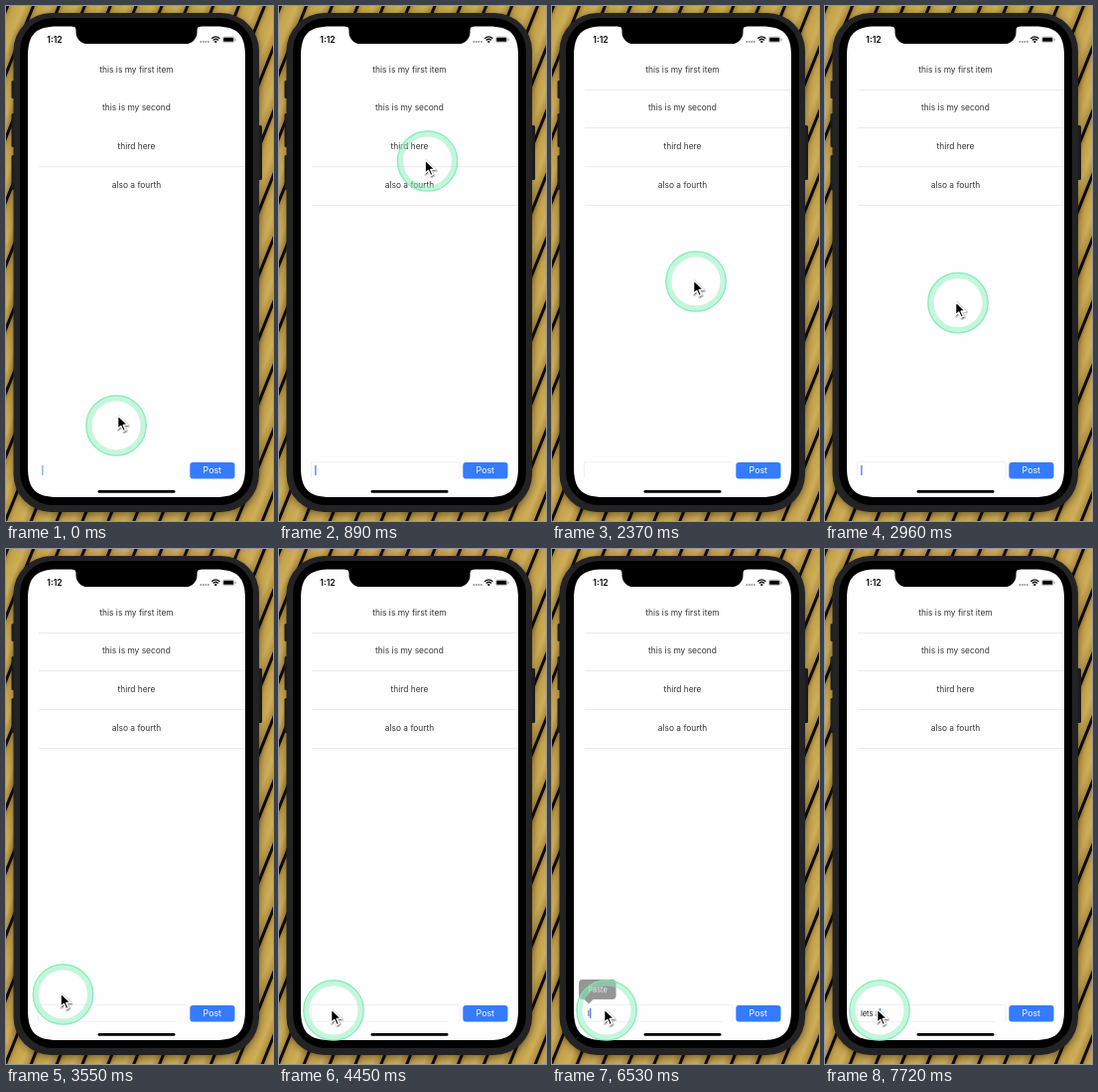
An HTML page that plays this animation: 269 by 518 pixels, repeating every 8 s.

```html
<!DOCTYPE html>
<html lang="en">
<head>
<meta charset="utf-8">
<title>List app demo</title>
<style>
  html, body { margin: 0; width: 100%; height: 100%; overflow: hidden; }
  svg { display: block; width: 100vw; height: 100vh; }
  text { font-family: Inter, "Liberation Sans", sans-serif; }
  .mid { text-anchor: middle; }
  .row { font-size: 8.4px; fill: #333; }
  .hair { fill: #ebebeb; }
</style>
</head>
<body>
<svg viewBox="0 0 269 518">
  <defs>
    <linearGradient id="plank">
      <stop offset="0" stop-color="#8f7130"/>
      <stop offset=".3" stop-color="#c5a24c"/>
      <stop offset=".7" stop-color="#ceae58"/>
      <stop offset="1" stop-color="#ad8c40"/>
    </linearGradient>
    <pattern id="wood" width="24" height="40" patternUnits="userSpaceOnUse" patternTransform="rotate(22)">
      <rect width="24" height="40" fill="url(#plank)"/>
      <rect width="3" height="40" fill="#0d0b06"/>
    </pattern>
    <filter id="soft" x="-10%" y="-10%" width="120%" height="120%">
      <feGaussianBlur stdDeviation="4"/>
    </filter>
    <path id="arrow" d="M0 0V14L3.300 11L5.600 16.300L8 15.200L5.800 10H10.200Z"/>
  </defs>

  <rect width="269" height="518" fill="url(#wood)"/>
  <rect x="8" y="9" width="247" height="502" rx="38" fill="#000" opacity=".45" filter="url(#soft)"/>

  <g fill="#1b1b1d">
    <rect x="5.500" y="75" width="5" height="18" rx="1.500"/>
    <rect x="5.500" y="108" width="5" height="34" rx="1.500"/>
    <rect x="5.500" y="150" width="5" height="35" rx="1.500"/>
    <rect x="253" y="120" width="5" height="55" rx="1.500"/>
  </g>
  <rect x="7.500" y="7" width="247.500" height="502" rx="38" fill="#232325"/>
  <rect x="14" y="12" width="235" height="490" rx="33" fill="#000"/>
  <path d="M22 50.500c0-22 8-30 30-30H211c22 0 30 8 30 30V464c0 22-8 30-30 30H52c-22 0-30-8-30-30Z" fill="#fefefe"/>

  <g id="list"></g>

  <path d="M66.500 20.500A4 4 0 0 1 70.500 24.500V26.500A11.500 11.500 0 0 0 82 38H181A11.500 11.500 0 0 0 192.500 26.500V24.500A4 4 0 0 1 196.500 20.500V19.500H66.500Z"/>
  <text x="41.300" y="36.800" font-size="8.600" font-weight="600">1:12</text>
  <path d="M195.600 36H205" stroke="#777" stroke-width="1.500" stroke-dasharray="1.500 1"/>
  <g fill="none" stroke="#111" stroke-width="1.300">
    <path d="M207.200 32.800Q211.300 29 215.400 32.800M208.700 34.500Q211.300 32.100 213.900 34.500"/>
    <circle cx="211.300" cy="36" r=".5"/>
  </g>
  <rect x="218.400" y="31" width="11.600" height="5.600" rx="1.600" fill="none" stroke="#999" stroke-width=".6"/>
  <rect x="219.200" y="31.800" width="10" height="4" rx=".9"/>
  <rect x="230.700" y="32.700" width=".9" height="2.200" rx=".4" fill="#888"/>

  <g id="field" fill="none" stroke="#f1f1f1">
    <path d="M32.500 475V458.500H180Q182 458.500 182 460.500V473.500Q182 475.500 180 475.500"/>
    <path id="base" d="M33 475.500H171"/>
  </g>
  <rect x="185.300" y="459" width="45.200" height="16.500" rx="3" fill="#347bff"/>
  <text class="mid" x="207.800" y="470.200" font-size="8.800" fill="#fff">Post</text>
  <text id="typed" x="36" y="470" font-size="7.400" fill="#111" style="white-space:pre"></text>
  <rect id="caret" y="462" width="1.300" height="10" fill="#4b7cf0"/>
  <rect id="home" x="92.500" y="487" width="78" height="2.800" rx="1.400"/>

  <g id="menu">
    <path d="M31 433H60.500Q64.500 433 64.500 437V449Q64.500 453 60.500 453H41.500L37 457.500L32.500 453H31Q27 453 27 449V437Q27 433 31 433Z" fill="#303032"/>
    <text class="mid" x="46" y="445.800" font-size="7.400" fill="#ddd">Paste</text>
  </g>

  <g id="ring" fill="none">
    <circle id="band" stroke="#8df0be" stroke-opacity=".5"/>
    <circle id="edge" stroke="#7ce9b2" stroke-opacity=".85"/>
  </g>
  <g id="pointer">
    <use href="#arrow" x=".8" y="1" stroke="#0003" stroke-width="3" stroke-linejoin="round"/>
    <use href="#arrow" stroke="#fff" stroke-width="1.600" stroke-linejoin="round"/>
  </g>
</svg>

<script>
const LOOP = 8000, STEP = LOOP / 54;
const $ = id => document.getElementById(id);
const set = (el, attrs) => {
  for (const name in attrs) el.setAttribute(name, attrs[name]);
};
const clamp = v => Math.max(0, Math.min(1, v));
const move = (el, x, y) => set(el, { transform: `translate(${x} ${y})` });

// Smooth 0 to 1 between steps a and b.
const ease = (n, a, b) => {
  const u = clamp((n - a) / (b - a));
  return u * u * (3 - 2 * u);
};
// Rises from a to b, falls from c to d.
const pulse = (n, a, b, c, d) => ease(n, a, b) - ease(n, c, d);

const rows = ["this is my first item", "this is my second", "third here", "also a fourth"];
const hairStart = [8, 8, 0, 1];

const hairs = rows.map((label, i) => {
  const add = (tag, attrs) => {
    const el = document.createElementNS("http://www.w3.org/2000/svg", tag);
    set(el, attrs);
    return $("list").appendChild(el);
  };
  const y = i * 38.7;
  add("text", { class: "row mid", x: 131.5, y: 66.6 + y }).textContent = label;
  return add("rect", { class: "hair", x: 33, y: Math.floor(84.2 + y), width: 208, height: 1 });
});

function drawPointer(n) {
  const reach = ease(n, -1, 6.5), drag = ease(n, 8, 12);
  const glide = ease(n, 19, 23.5), settle = ease(n, 24, 30);
  const start = ease(n, 0, 6);
  const x = 111 + 38 * start + 14 * Math.sin(Math.PI * reach) * start
    - 4 * drag - 87.5 * glide - 2.5 * settle;
  const y = 422 - 266 * start + 121 * drag + 171 * glide + 16 * settle;
  const press = pulse(n, 7, 9, 12, 14) + pulse(n, 31, 32, 33, 35);
  const r = 30.5 - 15.5 * press, band = 6 - 2.5 * press;

  move($("ring"), x, y);
  set($("edge"), { r: r - .3, "stroke-width": 1.3 - .3 * press });
  set($("band"), { r: r - band / 2, "stroke-width": band });
  // The arrow leads the ring at the start of the loop.
  const lead = 1 - start;
  move($("pointer"), x - 2.5 + 4 * lead, y - 1.5 - 9 * lead);
}

function drawCaret(n, typed) {
  const peak = n < 31 ? 6 : 37;
  const blink = clamp(.2 + .8 * Math.cos(2 * Math.PI * (n - peak) / 7));
  const end = typed ? $("typed").getComputedTextLength() : 0;
  set($("caret"), { x: 36.2 + end, opacity: typed ? 1 : blink });
}

function draw(n) {
  drawPointer(n);
  move($("list"), 0, Math.round(53.2 * pulse(n, 8, 12, 12, 15)));
  hairs.forEach((hair, i) => set(hair, { opacity: n < hairStart[i] ? 0 : 1 }));
  set($("field"), { opacity: n < 1 ? 0 : 1 });
  set($("base"), { opacity: n < 24 ? 0 : 1 });
  set($("home"), { opacity: 1 - .45 * pulse(n, 34, 36, 36, 38) });
  set($("menu"), { opacity: pulse(n, 34, 36.7, 43, 45) });

  const typed = Math.max(0, Math.floor((n - 42) * .6));
  $("typed").textContent = "lets a".slice(0, typed);
  drawCaret(n, typed);
}

function tick(now) {
  draw(Math.min(53, Math.floor((now % LOOP) / STEP + .1)));
  requestAnimationFrame(tick);
}
draw(0);
requestAnimationFrame(tick);
</script>
</body>
</html>
```
